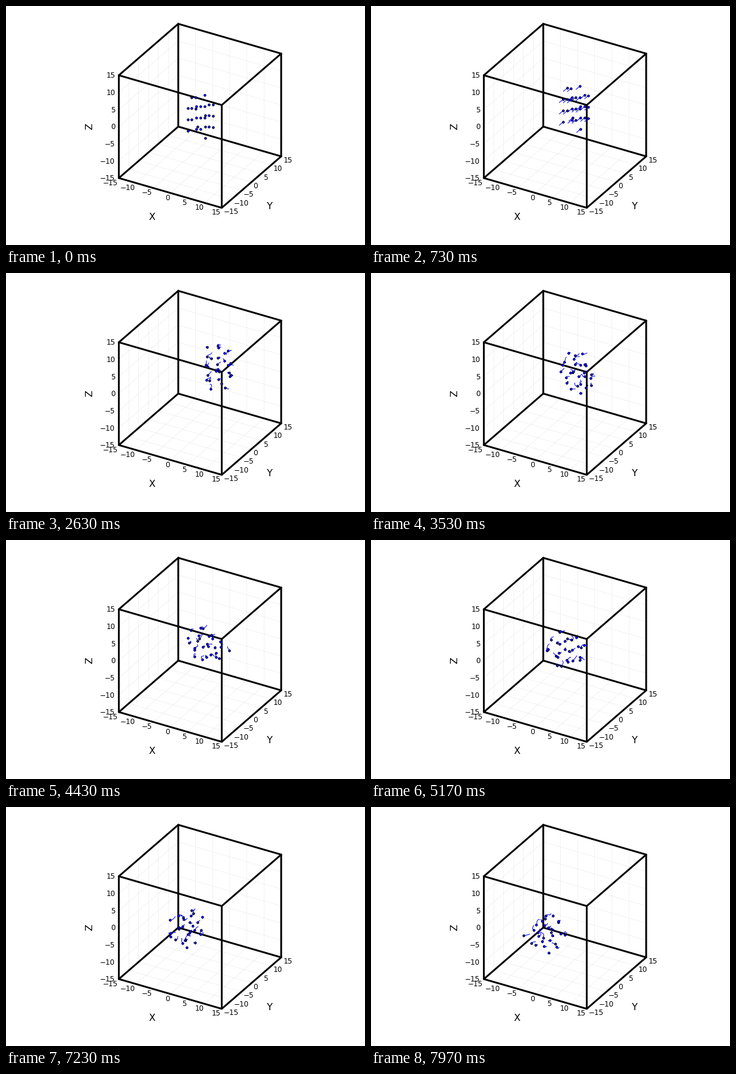
A matplotlib script for the animation above (8 s loop, 600 px wide and 400 px high).

```python
import itertools

import matplotlib.pyplot as plt
import numpy as np
from matplotlib.animation import FuncAnimation
from matplotlib.collections import LineCollection

W, H, DPI = 600, 400, 100
FRAMES, LOOP_MS = 240, 8000
PX = 72 / DPI                       # points per pixel
LIM = 15
TICKS = range(-LIM, LIM + 1, 5)
TRAIL = 8

# Lengths in box units, times in frames
SIGMA, EPSILON = 2.95, 0.03         # Lennard-Jones pair potential
SPEED_IN, SPEED_OUT = 0.25, 0.115   # drift along y before and after the wall
IMPACT, TURN = 46, 49
SUBSTEPS = 10


def project(x, y, z):
    """Orthographic view of the box, in pixels from the top left."""
    return (324.25 + 5.733 * x + 3.31 * y,
            183.8 + 1.66 * x - 2.87 * y - 5.733 * z)


def lattice():
    """Close-packed 3 x 3 x 3 block with one particle moved to a hollow."""
    a, b = np.array([2.8, -0.47, 0]), np.array([-0.52, 2.92, 0])
    pts = []
    for i, j, k in itertools.product((-1, 0, 1), repeat=3):
        z = 0.3 - 3.31 * k - 0.83 * (-1) ** (i + j)
        pts.append(i * a + j * b + (0.1, 0, z))
    pts[8] += (0.95, -0.87, -1.3)
    return np.array(pts)


def forces(pos):
    gap = pos[:, None] - pos
    r2 = (gap ** 2).sum(axis=2)
    np.fill_diagonal(r2, np.inf)
    s6 = (SIGMA ** 2 / r2) ** 3
    pull = 24 * EPSILON * (2 * s6 ** 2 - s6) / r2
    return (pull[..., None] * gap).sum(axis=1)


def collide(pos, vel, frames):
    """Run the cluster into the wall at y = LIM with velocity Verlet."""
    dt = 1 / SUBSTEPS
    acc = forces(pos)
    for _ in range(frames):
        yield pos.copy()
        for _ in range(SUBSTEPS):
            vel = vel + acc * dt / 2
            pos = pos + vel * dt
            acc = forces(pos)
            vel = vel + acc * dt / 2
            hit = pos[:, 1] > LIM
            vel[hit, 1] = -np.abs(vel[hit, 1])


def particle_paths():
    """Screen positions of all particles, shape (frame, particle, 2)."""
    start = lattice()
    flight = np.array([0, SPEED_IN, 0])
    path = [start + flight * n for n in range(IMPACT)]
    path += collide(start + flight * IMPACT, np.tile(flight, (len(start), 1)),
                    FRAMES - IMPACT)
    path = np.array(path)

    # The centre of mass flies in, rebounds and drifts back more slowly
    n = np.arange(FRAMES)
    centre = np.minimum(SPEED_IN * n,
                        SPEED_IN * TURN - SPEED_OUT * (n - TURN))
    path[..., 1] += (start[:, 1].mean() + centre
                     - path[..., 1].mean(axis=1))[:, None]
    return np.stack(project(*np.moveaxis(path, -1, 0)), axis=-1)


def segment(ax, a, b, **style):
    (x0, y0), (x1, y1) = project(*a), project(*b)
    ax.plot([x0, x1], [y0, y1], snap=False, **style)


def draw_grid(ax):
    style = dict(color="black", alpha=0.1, lw=0.5 * PX, zorder=1)
    lo, hi = -LIM, LIM
    for t in TICKS:
        segment(ax, (t, lo, lo), (t, hi, lo), **style)
        segment(ax, (t, hi, lo), (t, hi, hi), **style)
        segment(ax, (lo, t, lo), (hi, t, lo), **style)
        segment(ax, (lo, t, lo), (lo, t, hi), **style)
        segment(ax, (lo, lo, t), (lo, hi, t), **style)
        segment(ax, (lo, hi, t), (hi, hi, t), **style)


def draw_box(ax):
    corners = itertools.product((-LIM, LIM), repeat=3)
    for a, b in itertools.combinations(corners, 2):
        if sum(p != q for p, q in zip(a, b)) == 1:
            segment(ax, a, b, color="black", lw=3 * PX,
                    solid_capstyle="round", zorder=2)


def draw_labels(ax):
    def tick(pos, dx, dy, text, ha):
        ax.text(pos[0] + dx, pos[1] + dy + 4.4, text, ha=ha,
                va="baseline", fontsize=12 * PX, zorder=3)

    for t in TICKS:
        text = str(t).replace("-", "\u2212")
        tick(project(t, -LIM, -LIM), -1.3, 7.3, text, "right")
        tick(project(LIM, t, -LIM), 3.5, 5.8, text, "left")
        tick(project(-LIM, -LIM, t), -6.3, -0.1, text, "right")

    size = 16 * PX
    ax.text(243.6, 358, "X", ha="center", va="baseline", fontsize=size)
    ax.text(440.5, 340, "Y", ha="center", va="baseline", fontsize=size)
    ax.text(140.2, 201.2, "Z", ha="center", va="center", rotation=90,
            fontsize=size)


plt.rcParams["font.family"] = "DejaVu Sans"
fig = plt.figure(figsize=(W / DPI, H / DPI), dpi=DPI, facecolor="white")
ax = fig.add_axes([0, 0, 1, 1])
ax.set_xlim(0, W)
ax.set_ylim(H, 0)
ax.axis("off")

draw_grid(ax)
draw_box(ax)
draw_labels(ax)

paths = particle_paths()
trails = LineCollection([], colors="blue", linewidths=1 * PX, zorder=4)
ax.add_collection(trails, autolim=False)
dots, = ax.plot([], [], "o", ms=3.7 * PX, mfc="blue", mec="black",
                mew=0.75 * PX, zorder=5, snap=False)


def update(n):
    recent = paths[max(0, n - TRAIL):n + 1]
    trails.set_segments(list(recent.transpose(1, 0, 2)) if n else [])
    dots.set_data(paths[n, :, 0], paths[n, :, 1])
    return trails, dots


anim = FuncAnimation(fig, update, frames=FRAMES, interval=LOOP_MS / FRAMES,
                     init_func=lambda: update(0), repeat=True, repeat_delay=0)
plt.show()
```
